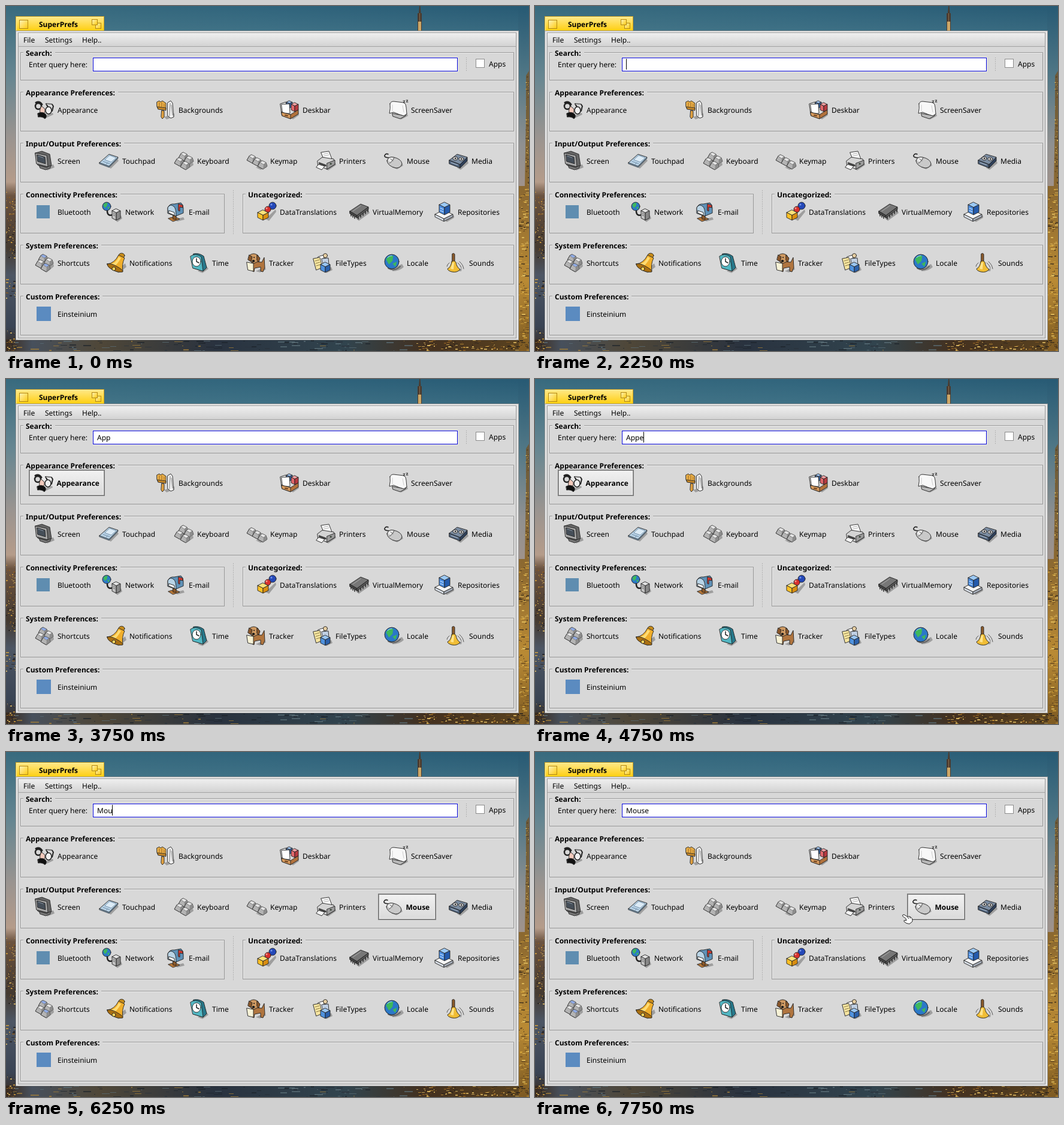
Animation, 873 px wide and 575 px high, one loop 8000 ms. Source, as an HTML page:

```html
<!DOCTYPE html>
<html lang="en">
<head>
<meta charset="utf-8">
<title>SuperPrefs</title>
<style>
html, body { margin: 0; width: 100%; height: 100%; overflow: hidden; background: #336b80; }
svg { display: block; }
text { font: 12px "Noto Sans", sans-serif; text-rendering: geometricPrecision; white-space: pre; }
.bold { font-weight: 700; }
.icon { stroke: #222; stroke-width: .9; stroke-linejoin: round; stroke-linecap: round; }
</style>
</head>
<body>
<svg id="stage" width="873" height="575" viewBox="0 0 873 575">
  <defs>
    <linearGradient id="sky" x2="1" y2="0"><stop stop-color="#386a7e"/><stop offset=".5" stop-color="#30647c"/><stop offset="1" stop-color="#275a74"/></linearGradient>
    <linearGradient id="haze" x2="0" y2="1"><stop stop-color="#6b98a2" stop-opacity="0"/><stop offset="1" stop-color="#6b98a2" stop-opacity=".25"/></linearGradient>
    <linearGradient id="west" x2="0" y2="1">
      <stop stop-color="#386a7e"/><stop offset=".2" stop-color="#668691"/><stop offset=".38" stop-color="#9a9490"/>
      <stop offset=".51" stop-color="#b59c8a"/><stop offset=".55" stop-color="#6b5340"/><stop offset=".7" stop-color="#453a30"/>
      <stop offset=".78" stop-color="#4d5664"/><stop offset=".93" stop-color="#3a4454"/><stop offset="1" stop-color="#3b2a1c"/>
    </linearGradient>
    <linearGradient id="east" x2="0" y2="1">
      <stop stop-color="#275a74"/><stop offset=".2" stop-color="#507786"/><stop offset=".4" stop-color="#8f9090"/><stop offset=".55" stop-color="#a3938a"/>
    </linearGradient>
    <linearGradient id="tower" x2="0" y2="1"><stop stop-color="#6a5a3c"/><stop offset=".45" stop-color="#8e6a30"/><stop offset=".75" stop-color="#b98a34"/><stop offset="1" stop-color="#7d5a22"/></linearGradient>
    <linearGradient id="shore" x2="1" y2="0">
      <stop stop-color="#3b2a1c"/><stop offset=".05" stop-color="#47505c"/><stop offset=".18" stop-color="#4f4738"/><stop offset=".4" stop-color="#29323f"/>
      <stop offset=".65" stop-color="#31444e"/><stop offset=".8" stop-color="#43301f"/><stop offset="1" stop-color="#5b431f"/>
    </linearGradient>
    <linearGradient id="tab" x2="0" y2="1"><stop stop-color="#ffe98a"/><stop offset="1" stop-color="#ffcb00"/></linearGradient>
    <linearGradient id="gold" x2="1" y2="1"><stop stop-color="#fff3b8"/><stop offset="1" stop-color="#ffcb10"/></linearGradient>
    <linearGradient id="menu" x2="0" y2="1"><stop stop-color="#efefef"/><stop offset="1" stop-color="#d3d3d3"/></linearGradient>
    <linearGradient id="press" x2="0" y2="1"><stop stop-color="#f2f2f2"/><stop offset="1" stop-color="#d9d9d9"/></linearGradient>
  </defs>
  <g id="city"></g>
  <g id="window"></g>
  <g id="items"></g>
  <text id="query" x="152" y="102"></text>
  <rect id="caret" y="88" width="1" height="18"/>
  <path id="hand" fill="#fff" stroke="#222" d="M1.500 3.500Q1 1 4 1L9.500 4.500Q13 3 15 5Q18.500 7 18 11L17.500 13L13 16.500L8 15.500L4 12.500Q3 10 6 10.500L8 11L7 7.500ZM10 5l2 3M13 4.500l2 3"/>
  <path id="beam" fill="none" stroke="#222" d="M1 .5h2l1.500 1l1.500-1h2M4.500 1.500v16M1 18.500h2l1.500-1l1.500 1h2"/>
</svg>
<script>
const $ = id => document.getElementById(id);
const rect = (x, y, w, h, fill, extra = '') => `<rect x="${x}" y="${y}" width="${w}" height="${h}" fill="${fill}" ${extra}/>`;
const frame = (x, y, w, h, stroke, fill = 'none') => rect(x + .5, y + .5, w - 1, h - 1, fill, `stroke="${stroke}"`);
const label = (x, y, s, bold) => `<text x="${x}" y="${y}"${bold ? ' class="bold"' : ''}>${s}</text>`;

// Icon primitives, all in a 32 x 32 cell
const p = (fill, d, extra = '') => `<path fill="${fill}" d="${d}" ${extra}/>`;
const line = (color, d, width = 1) => p('none', d, `stroke="${color}" stroke-width="${width}"`);
const disc = (fill, x, y, rx, ry = rx, extra = '') => `<ellipse fill="${fill}" cx="${x}" cy="${y}" rx="${rx}" ry="${ry}" ${extra}/>`;
const shadow = d => p('#0004', d, 'stroke="none"');
const cube = (x, y, w, h, top, left, right) =>
  p(top, `M${x} ${y}l${w} ${w / 2}l${-w} ${w / 2}l${-w} ${-w / 2}z`) +
  p(left, `M${x - w} ${y + w / 2}v${h}l${w} ${w / 2}v${-h}z`) +
  p(right, `M${x + w} ${y + w / 2}v${h}l${-w} ${w / 2}v${-h}z`);
// Keycap: a small tilted top on a wider base
const key = (x, y, top = '#e6e6e6') =>
  p('#b4b4b4', `M${x - 4} ${y + 2}L${x - 8} ${y + 9}L${x + 1} ${y + 14}L${x + 8} ${y + 9}L${x + 6} ${y + 3}L${x} ${y}Z`) +
  p('#8c8c8c', `M${x + 2} ${y + 6}L${x + 1} ${y + 14}L${x + 8} ${y + 9}L${x + 6} ${y + 3}Z`, 'stroke="none"') +
  p(top, `M${x - 4} ${y + 2}L${x} ${y}L${x + 6} ${y + 3}L${x + 2} ${y + 6}Z`, 'stroke="#666" stroke-width=".6"');
const globe = (x, y, r) => disc('#2b78c8', x, y, r) +
  p('#3eb85c', `M${x - r * .8} ${y - r * .3}q${r * .4} ${-r * .7} ${r} ${-r * .5}l${-r * .1} ${r * .7}l${-r * .5} ${r * .5}zM${x + r * .1} ${y + r * .3}l${r * .6} ${-r * .3}l${-r * .2} ${r * .7}z`, 'stroke="none"');

const icons = {
  Appearance: shadow('M14 27L30 21L31 24L18 30Z') + line('#222', 'M24 15L19 6L29 7L31 10L29 18', 2) + line('#eee', 'M20 6.500L28 7.500') +
    disc('#d8d8d8', 6, 10, 5, 5, 'stroke-width="2.500"') + disc('#efefef', 23, 17, 5, 6, 'stroke-width="1.500"') + line('#222', 'M2 4Q8 1 12 7', 3) +
    p('#f3cabc', 'M11 10Q6 20 11 22Q18 24 17 15Z') + p('#111', 'M5 22Q12 18 18 23Q21 27 17 31Q13 27 6 28Z'),
  Backgrounds: shadow('M14 28L31 22V27L18 32Z') + p('#f4f4f4', 'M20 4L25 1L28 5L30 28L25 30L20 26Z') + line('#777', 'M24 5L23 26M26 8L28 25') +
    p('#eab04a', 'M2 3L6 1L8 3L11 1L17 5L17 15L4 14L2 11Z') + p('#c98a2a', 'M3 11L17 13V17L4 15Z') + line('#9a6418', 'M6 4V10M10 4V11M14 6V12') + p('#e0a040', 'M10 17L14 18V28L11 31L9 28Z'),
  Deskbar: shadow('M18 29L31 20L32 25L22 32Z') + p('#f0f0f0', 'M1 6L10 3L13 17L3 20Z') + cube(16, 1, 5, 7, '#9cc0ec', '#5d8ed0', '#3a68aa') +
    cube(25, 4, 6, 9, '#f4a0a2', '#e2686c', '#b8393f') + p('#fff', 'M3 7L16 6L17 22L5 22Z') + p('#b2723c', 'M3 20L18 24L31 16V23L18 31L4 26Z') + p('#d59a5e', 'M3 20L18 24V31L4 26Z') + line('#6b3f1c', 'M9 25L13 26', 2),
  ScreenSaver: shadow('M16 29L31 21L33 26L22 32Z') + p('#b8b8b8', 'M7 22L23 25L29 20V26L20 31L8 27Z') + p('#f8f8f8', 'M3 6Q4 2 9 2L26 4Q30 6 30 12L31 23L26 26L19 24L9 20L2 22Q4 13 3 6Z') +
    line('#ccc', 'M7 8L7 18M24 9L26 20') + line('#222', 'M25 1h3l-3 3h3M30 0h3l-3 3h3'),
  Screen: shadow('M16 28L31 22L33 27L21 32Z') + p('#666', 'M1 3L12 0L25 5L28 24L17 30L5 23Z') + p('#a8a8a8', 'M1 3L20 7L22 26L3 21Z') + p('#454e58', 'M4 6L17 10L18 21L5 17Z') + line('#8794a2', 'M6 8L14 11') + p('#777', 'M8 24L20 27L26 24V28L18 31L9 28Z'),
  Touchpad: shadow('M14 26L30 13L32 16L19 29Z') + p('#b8d2e6', 'M0 19L16 5L31 10L16 25Z') + p('#7390a8', 'M0 19L16 25L31 10V12L16 27L0 21Z', 'stroke-width=".6"') + p('#dcebf6', 'M9 14L17 7L28 11L20 18Z', 'stroke="#7390a8"') + line('#7390a8', 'M6 17L17 21M11 22L14 19'),
  Keyboard: shadow('M14 29L31 19L32 23L20 31Z') + key(15, 2) + key(24, 8) + key(8, 11) + key(18, 17),
  Keymap: shadow('M14 27L32 22V27L22 31Z') + key(7, 6) + key(16, 11) + key(25, 16),
  Printers: shadow('M14 29L31 18L33 23L20 32Z') + p('#fff', 'M8 2L21 0L26 13L14 16Z') + line('#aaa', 'M12 5l8-2M13 8l8-2') + p('#d4d4d4', 'M2 16L10 10L29 13L31 22L18 30L3 24Z') + p('#9b9b9b', 'M18 20L31 15V22L18 30Z') + p('#555', 'M5 19L16 23V25L5 21Z') + p('#f5f5f5', 'M4 22L14 25L9 31L0 27Z') + disc('#4db34d', 24, 21, 1),
  Mouse: shadow('M13 27L30 20L32 24L22 30Z') + line('#222', 'M10 11Q0 11 1 7Q3 3 7 5', 1.600) + p('#c9c9c9', 'M5 16Q7 8 16 10Q29 13 30 21Q28 28 20 28Q6 25 5 16Z') + p('#eee', 'M7 15Q9 10 15 11Q14 16 10 18Z', 'stroke="none"') + line('#555', 'M9 20Q14 18 17 11M11 13L15 16'),
  Media: shadow('M14 28L31 15L33 20L20 31Z') + p('#7b8da3', 'M1 15L14 5L31 10L19 22Z') + p('#4c5f78', 'M1 15L19 22V28L1 21Z') + p('#2f4059', 'M19 22L31 10V16L19 28Z') + disc('#ddd', 11, 12, 4, 3) + disc('#ddd', 21, 13, 4, 3) + disc('#444', 11, 12, 1) + disc('#444', 21, 13, 1) + line('#c8d4e0', 'M4 19L15 23'),
  Bluetooth: rect(3, 5, 22, 22, '#5f8db0', 'stroke="none"'),
  Network: shadow('M20 29L31 22L33 27L25 33Z') + line('#222', 'M8 14Q8 24 17 21', 2.500) + globe(7, 7, 7) + cube(23, 11, 7, 12, '#e2e2e2', '#c2c2c2', '#888') + line('#555', 'M18 18L21 20M18 21L21 23'),
  'E-mail': shadow('M14 29L29 25L31 29L19 32Z') + p('#b87736', 'M4 27L14 24L23 28L12 32Z') + p('#8d5a2a', 'M12 20L17 21V29L12 28Z') + p('#5f91b7', 'M3 18V9Q6 2 14 3L25 1Q29 4 29 10V18L17 23Z') + p('#b9d4e6', 'M3 18V9Q7 2 13 7Q17 10 17 23Z') + p('#f6f6f6', 'M5 14L14 17V22L5 18Z') + p('#d53c32', 'M21 3L28 5V9L23 8V15L21 14Z'),
  DataTranslations: shadow('M14 28L31 12L32 16L20 31Z') + disc('#2448b8', 26, 6, 6) + disc('#7797ea', 24, 4, 1.500, 1.500, 'stroke="none"') + disc('#d8302e', 18, 12, 5) + disc('#ff9a8c', 16, 10, 1.500, 1.500, 'stroke="none"') + cube(10, 13, 9, 8, '#ffe27a', '#ffc125', '#d98d10'),
  VirtualMemory: shadow('M10 27L31 13L33 18L15 31Z') + line('#222', 'M2 18v5M5 20v5M8 22v5M14 23v5M18 20v5M22 17v5M26 14v5M30 11v5', 1.500) + p('#777', 'M0 15L18 3L31 8L12 22Z') + p('#444', 'M0 15L12 22V26L0 19Z') + p('#555', 'M12 22L31 8V12L12 26Z') + line('#aaa', 'M5 15L18 6'),
  Repositories: shadow('M16 30L32 22V26L20 33Z') + cube(15, 13, 15, 4, '#f4f4f4', '#d6dce4', '#a6adb8') + cube(16, 0, 9, 12, '#9cc9f5', '#4a8ce0', '#245bad') + line('#dceeff', 'M9 10L14 12M9 14L14 16'),
  Shortcuts: shadow('M14 29L31 17L32 22L20 32Z') + key(14, 2, '#8fabe6') + key(23, 8) + key(9, 11) + key(18, 17, '#8fabe6'),
  Notifications: shadow('M14 30L31 17L33 23L20 33Z') + disc('#c88d1c', 25, 4, 5, 4) + p('#f0ae2b', 'M1 18Q13 17 20 3L30 8Q25 18 27 30Q20 32 10 27Q2 24 1 18Z') + p('#ffdc72', 'M5 18Q16 17 20 6L24 8Q17 20 12 22Z', 'stroke="none"') + p('#aa7012', 'M1 18Q7 16 17 22Q28 28 27 31Q20 33 10 28Q0 22 1 18Z') + disc('#ffd55c', 12, 26, 3),
  Time: shadow('M14 30L28 21L32 26L22 33Z') + p('#27798c', 'M7 1Q16-1 24 5L29 24L23 30L7 25Z') + p('#52b7c3', 'M2 5Q10-1 20 6L23 30L6 25Z') + disc('#fff', 12, 14, 7, 8) + line('#222', 'M12 9V14L16 16', 1.500),
  Tracker: shadow('M16 30L31 23L33 27L23 32Z') + p('#b0753f', 'M15 14L26 15L30 7L31 24L28 31L24 30V23L14 25L13 31L9 29V14Z') + p('#f7f2d6', 'M1 15L12 17V30L3 28Z') + p('#cf9a62', 'M6 3Q13-2 20 4L21 13L13 17L5 12Z') + p('#8a5629', 'M5 3L10 6L8 14L3 11Z') + p('#8a5629', 'M18 3L23 8L21 15L18 12Z') + disc('#111', 13, 7, .6) + disc('#111', 12, 13, 2, 1.500),
  FileTypes: shadow('M18 29L31 23L33 28L23 33Z') + p('#fff', 'M9 6L18 3L20 19L11 21Z') + disc('#e8cfa2', 21, 4, 3.500) + p('#c0d0e4', 'M15 9L26 8L27 19L18 21Z') + p('#f6e5a1', 'M1 9L12 7L16 24L6 28Z') + line('#8a7a42', 'M4 13l7-2M5 17l7-2M6 21l7-2') + cube(21, 15, 8, 9, '#9ac6f4', '#4f92df', '#2b61ac'),
  Locale: shadow('M14 26L30 18L33 23Q26 30 14 30Z') + line('#666', 'M7 25Q18 31 27 22', 2) + globe(13, 14, 12) + line('#a9d9ff', 'M6 7Q9 4 13 4'),
  Sounds: shadow('M10 30L26 25L25 30Z') + p('#8a5a2b', 'M10 1Q13-1 14 2L14 14H10Z') + p('#f0bd35', 'M9 14Q13 11 16 15Q17 23 23 27Q18 33 9 31Q2 29 2 26Q8 23 9 14Z') + p('#ffe48c', 'M10 16L13 15L12 27L7 26Z', 'stroke="none"') + line('#555', 'M19 16Q23 19 25 24M22 14Q28 19 29 26M5 16Q1 19 1 22'),
  Einsteinium: rect(3, 4, 24, 24, '#5b8bc0', 'stroke="none"'),
};

// Label positions per row; highlighted items add a button's left edge and width
const rows = [
  [174, { Appearance: 86, Backgrounds: 288, Deskbar: 495, ScreenSaver: 676 }],
  [259, { Screen: 86, Touchpad: 194, Keyboard: 319, Keymap: 441, Printers: 556, Mouse: 669, Media: 777 }],
  [344, { Bluetooth: 86, Network: 199, 'E-mail': 305, DataTranslations: 457, VirtualMemory: 612, Repositories: 754 }],
  [429, { Shortcuts: 86, Notifications: 206, Time: 344, Tracker: 439, FileTypes: 550, Locale: 669, Sounds: 773 }],
  [514, { Einsteinium: 86 }],
];
const buttons = { Appearance: [38, 127], Backgrounds: [240, 132], Keymap: [393, 104], Mouse: [621, 97], VirtualMemory: [563, 143] };
const keywords = { Backgrounds: 'wallpaper' };
const groups = [
  ['Search:', 24, 77, 824, 47], ['Appearance Preferences:', 24, 143, 824, 66], ['Input/Output Preferences:', 24, 228, 824, 66],
  ['Connectivity Preferences:', 24, 313, 341, 66], ['Uncategorized:', 395, 313, 453, 66],
  ['System Preferences:', 24, 398, 824, 66], ['Custom Preferences:', 24, 483, 824, 66],
];

function drawCity() {
  let seed = 7;
  const random = () => (seed = seed * 16807 % 2147483647) / 2147483647;
  const scatter = (n, x, y, w, h, long, colors) => Array.from({ length: n }, () =>
    rect(Math.floor(x + random() * w), Math.floor(y + random() * h), Math.ceil(random() * long), Math.ceil(random() * 2),
      colors[Math.floor(random() * colors.length)], 'opacity=".7"')).join('');
  const lights = ['#e0a83e', '#f6cd6b', '#8f5f22', '#241f1c'];
  const floors = ['#f2cf68', '#dba93c', '#6a4b20', '#3a2b1a'];
  const water = ['#5c7078', '#2a333c', '#a98238', '#1d242c'];
  $('city').innerHTML = rect(0, 0, 873, 575, 'url(#sky)') + rect(0, 0, 873, 42, 'url(#haze)') +
    rect(0, 0, 17, 575, 'url(#west)') + rect(855, 0, 18, 575, 'url(#east)') + rect(0, 556, 873, 19, 'url(#shore)') +
    p('#4a3b30', 'M690 0h1.500l1 12h1.500v30h-7v-30h2z') + rect(688, 26, 5, 16, '#cda868') + line('#8d6c48', 'M690.500 12v14') +
    p('url(#tower)', 'M873 108l-5 8v70l-2 114h-10v275h17z') +
    scatter(70, 0, 310, 16, 110, 3, lights) + scatter(20, 0, 455, 16, 32, 5, lights) + scatter(25, 0, 535, 16, 40, 3, lights) +
    scatter(60, 867, 116, 6, 190, 5, floors) + scatter(150, 856, 305, 14, 265, 7, floors) +
    scatter(110, 10, 557, 675, 18, 14, water) + scatter(110, 685, 557, 188, 18, 6, lights);
}

function drawWindow() {
  const dotted = (x, y, h) => p('none', `M${x}.5 ${y}v${h}`, 'stroke="#989898" stroke-dasharray="1 2"');
  $('window').innerHTML =
    frame(16, 17, 148, 28, '#d3a31a', 'url(#tab)') + p('none', 'M17.500 42V18.500H163', 'stroke="#fff0a8"') +
    [[22, 23, 15], [149, 28, 10], [143, 22, 10]].map(([x, y, s]) => frame(x, y, s, s, '#b18812', 'url(#gold)')).join('') +
    label(55, 35, 'SuperPrefs', true) +
    frame(16, 41, 840, 516, '#989898', '#d8d8d8') + frame(17, 42, 838, 514, '#f0f0f0') + frame(18, 43, 836, 512, '#e0e0e0') + frame(20, 44, 832, 510, '#a0a0a0') +
    rect(21, 45, 830, 22, 'url(#menu)') + rect(21, 67, 830, 1, '#a3a3a3') +
    label(29, 61, 'File') + label(65, 61, 'Settings') + label(127, 61, 'Help..') +
    groups.map(([name, x, y, w, h]) => frame(x + 1, y + 1, w - 1, h - 1, '#ececec') + frame(x, y, w, h, '#989898') +
      rect(x + 5, y, 0, 2, '#d8d8d8', 'class="gap"') + label(x + 9, y + 6, name, true)).join('') +
    dotted(768, 86, 24) + dotted(379, 307, 74) +
    label(38, 102, 'Enter query here:') + frame(144, 85, 611, 25, '#e8e8e8') + frame(145, 86, 609, 23, '#0000d5', '#fff') +
    frame(784, 88, 15, 15, '#8c8c8c', '#fff') + label(806, 101, 'Apps');
  for (const gap of document.querySelectorAll('.gap'))
    gap.setAttribute('width', Math.round(gap.nextElementSibling.getComputedTextLength()) + 9);
}

function drawItems(query) {
  const needle = query.toLowerCase();
  const matches = name => needle.length > 1 && (name + ' ' + (keywords[name] || '')).toLowerCase().includes(needle);
  const item = (name, x, y) => {
    const hit = matches(name) && buttons[name];
    const [left, width] = hit || [];
    const iconX = hit ? left + 9 : x - 38;
    return (hit ? frame(left, y - 23, width, 44, '#777', 'url(#press)') + frame(left + 1, y - 22, width - 2, 42, '#8f8f8f') + frame(left + 2, y - 21, width - 4, 40, '#f3f3f3') : '') +
      `<g class="icon" transform="translate(${iconX} ${y - 17})">${icons[name]}</g>` +
      label(hit ? left + 46.5 : x, y + 4, name, hit);
  };
  $('items').innerHTML = rows.flatMap(([y, row]) => Object.entries(row).map(([name, x]) => item(name, x, y))).join('');
}

// start ms, query, caret shown, pointer, pointer x, pointer y
const steps = [
  [0, '', 0], [250, '', 1], [1000, '', 1, 'hand', 312, -6], [1250, '', 0, 'hand', 168, 57],
  [1500, '', 0, 'beam', 161, 86], [1750, '', 0, 'beam', 163, 92], [2000, '', 0], [2250, '', 1],
  [2750, 'Ap', 1], [3000, 'App', 1], [3750, 'App', 0], [4000, 'Appe', 1], [4250, 'Appea', 1], [4750, 'Appe', 1],
  [5250, '', 1], [5750, 'M', 1], [6000, 'Mo', 1], [6250, 'Mou', 1], [6500, 'Mous', 1], [6750, 'Mouse', 1],
  [7250, 'Mouse', 0, 'hand', 227, 157], [7500, 'Mouse', 0, 'hand', 416, 206], [7750, 'Mouse', 0, 'hand', 612, 270],
];
let current;

function show(step) {
  const [, query, caret, pointer, x, y] = step;
  if (!current || current[1] !== query) drawItems(query);
  current = step;
  $('query').textContent = query;
  $('caret').setAttribute('x', 152 + Math.floor((query && $('query').getComputedTextLength()) + .4));
  $('caret').style.display = caret ? '' : 'none';
  for (const id of ['hand', 'beam']) {
    $(id).style.display = id === pointer ? '' : 'none';
    if (id === pointer) $(id).setAttribute('transform', `translate(${x} ${y})`);
  }
}

function tick() {
  const time = performance.now() % 8000;
  const step = steps.findLast(s => s[0] <= time);
  if (step !== current) show(step);
  requestAnimationFrame(tick);
}

drawCity();
drawWindow();
tick();
</script>
</body>
</html>
```
